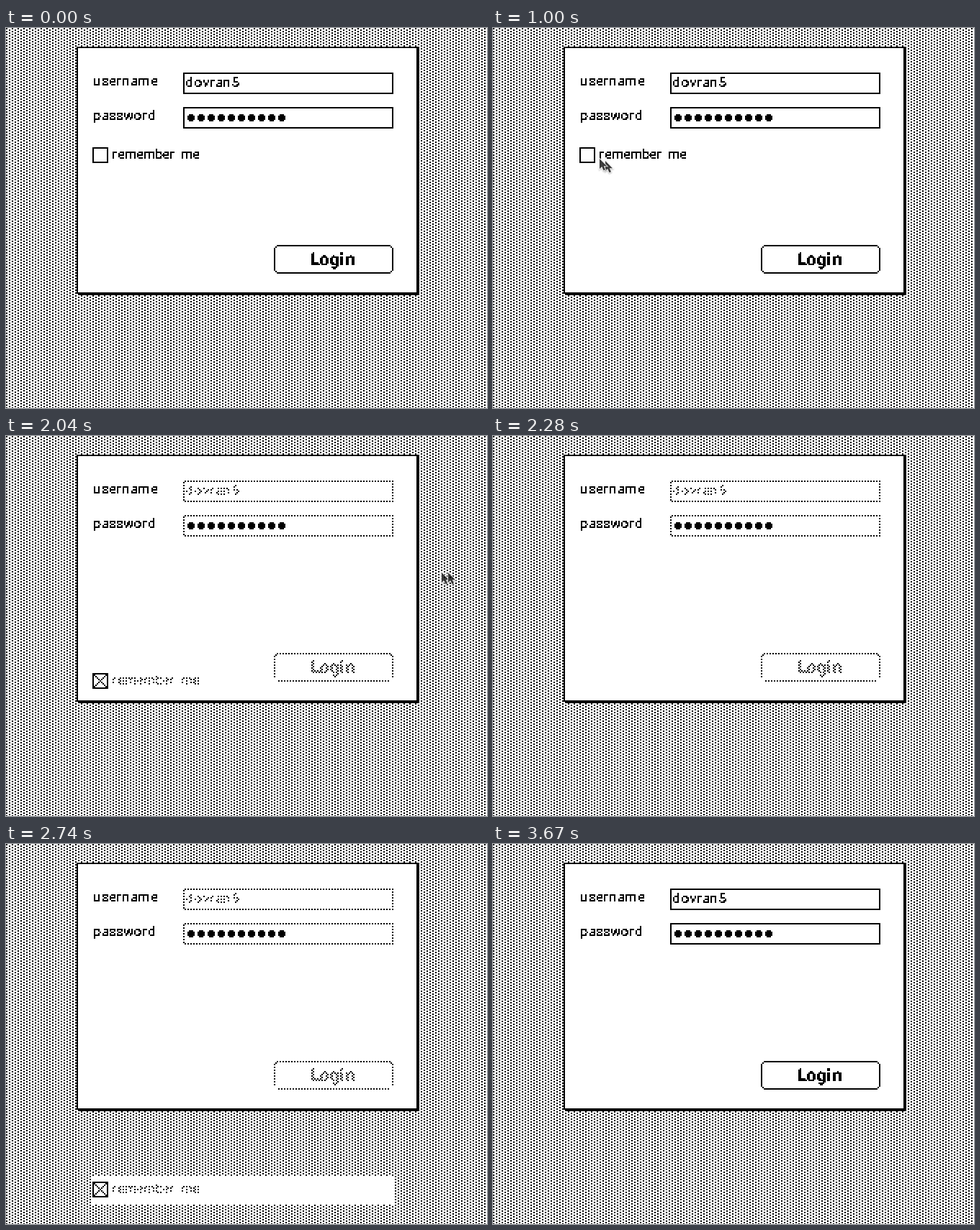
Animation of 668 by 529 pixels, one loop 5070 ms. Source, as an HTML page with a canvas:

```html
<!DOCTYPE html>
<html lang="en">
<head>
<meta charset="utf-8">
<title>Login</title>
<style>
  html, body { margin: 0; width: 100%; height: 100%; overflow: hidden; background: #fff; }
  canvas { display: block; }
</style>
</head>
<body>
<canvas id="stage" width="668" height="529"></canvas>
<script>
// The interface lives on a 334 x 265 pixel grid shown at double size.
const W = 334, H = 265, LOOP = 5070, TRACE = 30;
const CLICK = 1540, FALL = 1570, REAPPEAR = 2350, APEX = 2672, ENABLE = 3670;
const GRAVITY = 742e-6;

const stage = document.getElementById('stage').getContext('2d');
stage.imageSmoothingEnabled = false;

function layer(width, height, draw) {
  const canvas = document.createElement('canvas');
  canvas.width = width;
  canvas.height = height;
  draw(canvas.getContext('2d', { willReadFrequently: true }));
  return canvas;
}

const pattern = isBlack => layer(W, H, c => {
  for (let y = 0; y < H; y++)
    for (let x = 0; x < W; x++)
      if (isBlack(x, y)) c.fillRect(x, y, 1, 1);
});
const lightGray = pattern((x, y) => x % 4 === y % 2 * 2);
const checker = pattern((x, y) => (x + y) % 2);

// Thins a layer whose top left corner lies at x, y on the screen.
const dithered = (source, x = 0, y = 0) => layer(source.width, source.height, c => {
  c.drawImage(source, 0, 0);
  c.globalCompositeOperation = 'destination-in';
  c.drawImage(checker, -x, -y);
});

// Draws text as hard pixels: each glyph is set large, then sampled by coverage.
function pixelText(c, text, x, baseline, { size = 9.5, weight = 400, tracking = 0 } = {}) {
  const k = 8, cols = 18, rows = 20, base = 13, pad = 2;
  layer(cols * k, rows * k, pen => {
    pen.font = `${weight} ${size * k}px Roboto, sans-serif`;
    for (const ch of text) {
      pen.clearRect(0, 0, cols * k, rows * k);
      pen.fillText(ch, (pad - 0.4) * k, base * k);
      const { data } = pen.getImageData(0, 0, cols * k, rows * k);
      const cover = new Float32Array(cols * rows);
      for (let i = 0; i < cols * rows * k * k; i++) {
        const px = i % (cols * k), py = Math.floor(i / (cols * k));
        cover[Math.floor(py / k) * cols + Math.floor(px / k)] += data[i * 4 + 3] / 255 / k / k;
      }
      cover.forEach((a, i) => {
        if (a > 0.4) c.fillRect(x + i % cols - pad, baseline - base + Math.floor(i / cols), 1, 1);
      });
      x += Math.max(4, Math.round(pen.measureText(ch).width / k + tracking));
    }
  });
}

// One-pixel outline; cut > 0 trims the corners.
function outline(c, x, y, w, h, cut = 0) {
  for (const top of [y, y + h - 1]) c.fillRect(x + cut, top, w - 2 * cut, 1);
  for (const left of [x, x + w - 1]) c.fillRect(left, y + cut, 1, h - 2 * cut);
  if (cut)
    for (const px of [x + 1, x + w - 2])
      for (const py of [y + 1, y + h - 2]) c.fillRect(px, py, 1, 1);
}

const desktop = layer(W, H, c => {
  c.fillStyle = '#fff';
  c.fillRect(0, 0, W, H);
  c.drawImage(lightGray, 0, 0);
  c.fillStyle = '#000';
  c.fillRect(50, 14, 237, 172);
  c.fillRect(49, 13, 237, 172);
  c.fillStyle = '#fff';
  c.fillRect(50, 14, 235, 170);
});

const loose = { tracking: 0.28 };

const fixed = layer(W, H, c => {
  pixelText(c, 'username', 61, 40, loose);
  pixelText(c, 'password', 61, 64, loose);
  for (let i = 0; i < 10; i++) {
    c.fillRect(127 + 7 * i, 60, 3, 5);
    c.fillRect(126 + 7 * i, 61, 5, 3);
  }
});

const controls = layer(W, H, c => {
  outline(c, 123, 31, 146, 15);
  outline(c, 123, 55, 146, 15);
  outline(c, 186, 151, 83, 20, 2);
  pixelText(c, 'dovran5', 125, 41, loose);
  pixelText(c, 'Login', 212, 165, { size: 12, weight: 700 });
});
const controlsOff = dithered(controls);

const caption = layer(209, 20, c => pixelText(c, 'remember me', 14, 12));
const captionOff = dithered(caption, 60, 79);

const row = checked => layer(209, 20, c => {
  c.fillStyle = '#fff';
  c.fillRect(0, 0, 209, 20);
  c.fillStyle = '#000';
  outline(c, 0, 4, 11, 11);
  c.drawImage(checked ? captionOff : caption, 0, 0);
  if (checked)
    for (let i = 1; i < 10; i++) {
      c.fillRect(i, 4 + i, 1, 1);
      c.fillRect(10 - i, 4 + i, 1, 1);
    }
});
const rowOn = row(false), rowOff = row(true);

function rowTop(t) {
  if (t < FALL) return 158;
  return t < REAPPEAR ? 158 + GRAVITY * (t - FALL) ** 2 : 458 + GRAVITY * (t - APEX) ** 2;
}

const linear = p => p;
const easeOut = p => 1 - (1 - p) ** 2;
const easeInOut = p => p * p * (3 - 2 * p);

// Pointer path: time, x, y and the easing towards that point.
const path = [
  [90, 643, 232],
  [570, 198, 198, easeOut],
  [780, 198, 198, linear],
  [1090, 134, 177, easeInOut],
  [1690, 134, 177, linear],
  [2010, 604, 189, easeInOut],
  [2040, 613, 189, linear],
  [2100, 650, 188, linear],
  [2130, 690, 188, linear],
];

function pointerAt(t) {
  const i = path.findIndex(p => p[0] > t);
  if (i < 1) return null;
  const [t0, x0, y0] = path[i - 1], [t1, x1, y1, ease] = path[i];
  const p = ease((t - t0) / (t1 - t0));
  return { x: x0 + (x1 - x0) * p, y: y0 + (y1 - y0) * p };
}

const arrow = new Path2D('M0 0V14L3.2 11L5.5 16.3L8 15.2L5.8 10.2H10Z');

function drawPointer({ x, y }, alpha) {
  stage.save();
  stage.globalAlpha = alpha;
  stage.translate(Math.round(x) + 1, Math.round(y) + 1);
  stage.strokeStyle = '#fff';
  stage.lineWidth = 2;
  stage.shadowColor = 'rgba(0,0,0,.35)';
  stage.shadowBlur = 2;
  stage.shadowOffsetY = 1;
  stage.stroke(arrow);
  stage.shadowColor = 'transparent';
  stage.fill(arrow);
  stage.restore();
}

const show = (image, x = 0, y = 0) =>
  stage.drawImage(image, 2 * x, 2 * y, 2 * image.width, 2 * image.height);

function render(now) {
  const t = Math.round(now / 10) * 10 % LOOP;
  show(desktop);
  show(t < CLICK ? rowOn : rowOff, 60, Math.round(rowTop(t) / 2));
  show(fixed);
  show(t >= CLICK && t < ENABLE ? controlsOff : controls);

  // A moving pointer blends with its place a moment before.
  const pointer = pointerAt(t), trace = pointerAt(t - TRACE);
  if (pointer) {
    const moving = trace && Math.hypot(pointer.x - trace.x, pointer.y - trace.y) > 2;
    if (moving) drawPointer(trace, 0.75);
    drawPointer(pointer, moving ? 0.75 : 1);
  }
}

const start = performance.now();
function tick() {
  render(performance.now() - start);
  requestAnimationFrame(tick);
}
tick();
</script>
</body>
</html>
```
